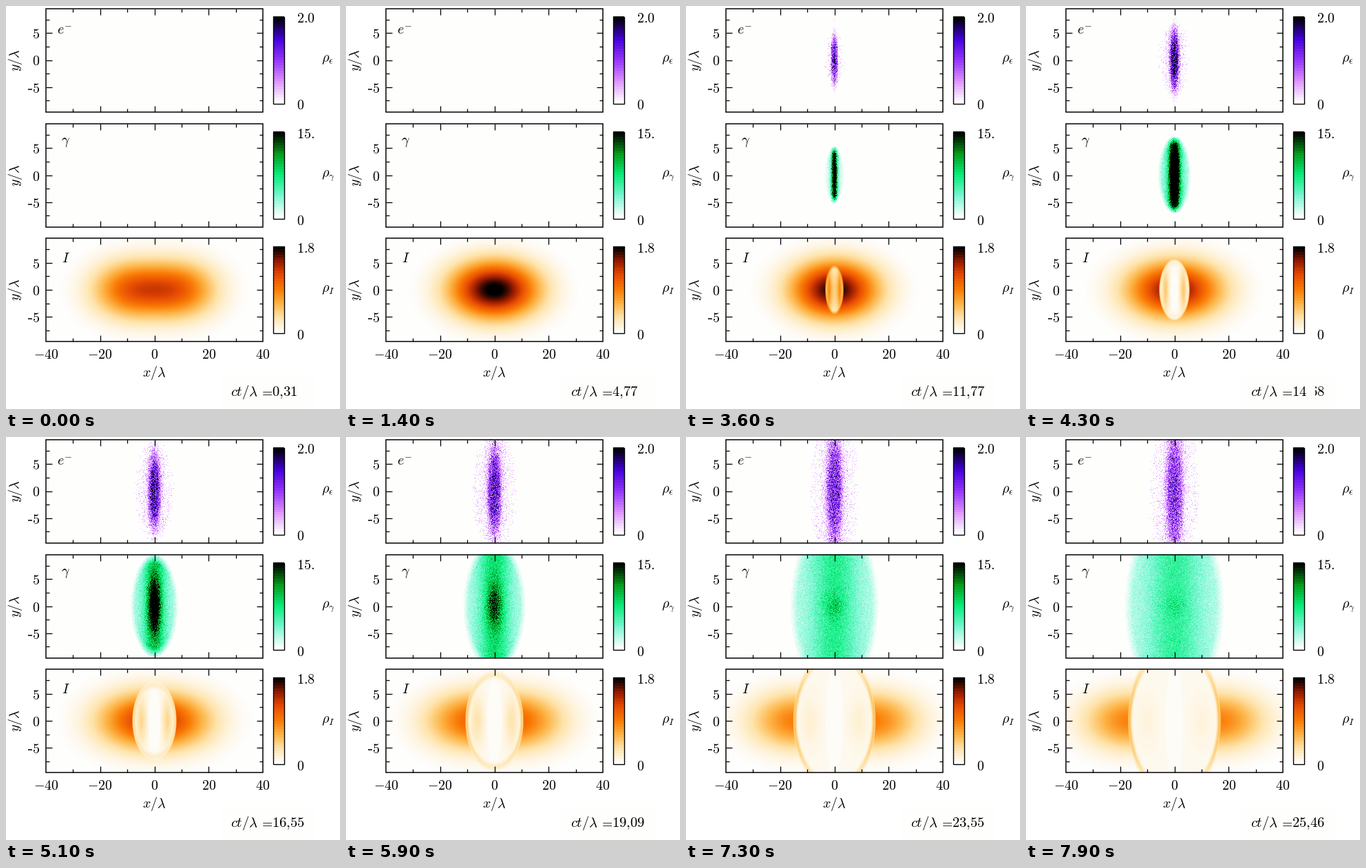
Recreate the animation shown at these times as a matplotlib script. Size 485x585 px, loop 8000 ms.

```python
import math

import matplotlib.pyplot as plt
import numpy as np
from matplotlib.animation import FuncAnimation
from matplotlib.colors import LinearSegmentedColormap
from matplotlib.patches import Rectangle

W, H, DPI = 485, 585, 80
FRAMES, INTERVAL = 80, 100
PT = 72 / DPI  # points per pixel
LEFT, PANEL_W, PANEL_H = 58, 315, 150
TOPS = (3.5, 170.5, 337)
SX, SY = PANEL_W / 80, 7.85  # pixels per wavelength
PAPER = "#fefefd"
IGNITION = 8.5  # ct/lambda at which the cascade starts
CROSSING = 9.3  # ct/lambda at which the two pulses overlap

plt.rcParams["mathtext.fontset"] = "cm"


def palette(name, *colors):
    return LinearSegmentedColormap.from_list(name, [PAPER, *colors, "black"])


PURPLE = palette("electrons", "#dd90ff", "#9434fb", "#4200da")
GREEN = palette("photons", "#78f7d2", "#06ee7a", "#079a1a")
ORANGE = palette("intensity", "#ffe4ac", "#fdb548", "#fa7d06", "#e84c03", "#9c1c00")

X, Y = np.meshgrid((np.arange(PANEL_W) + .5 - PANEL_W / 2) / SX,
                   (PANEL_H / 2 - .5 - np.arange(PANEL_H)) / SY)
JAG = np.repeat(np.random.default_rng(4).uniform(-.35, .15, PANEL_H // 3), 3)[:, None]


def gauss(u, width):
    return np.exp(-(u / width) ** 2)


def radius(a, b):
    return np.hypot(X / a, Y / b)


def inside(r, half_width, soft):
    return np.clip((1 - r) * half_width / soft + .5, 0, 1)


def grainy(mean, quantum, rng):
    return quantum * rng.poisson(mean / quantum)


def electrons(w, rng):
    """Density once the cascade front has travelled the distance w."""
    growth = min(w / 4, 1) ** 2
    core = radius(3.3 * (1 - math.exp(-w / 9)), 2.8 + .4 * w)
    cloud_w, cloud_h = 9 * math.tanh(w / 8), math.hypot(w, 3.3)
    cloud = inside(radius(cloud_w, cloud_h), cloud_w, 1.5)
    stripes = 1 + gauss(w, 7) * np.cos(2 * np.pi * X / 1.02)
    halo = (.14 + .4 * math.exp(-w / 4)) * stripes
    halo = halo * gauss(X, .38 * cloud_w) * gauss(Y, .8 * cloud_h) + .015
    peak = .24 + .6 * math.exp(-w / 12)
    dense = grainy(growth * peak * np.exp(-.7 * core ** 4), .07, rng)
    return dense + grainy(growth * halo * cloud, .16, rng)


def photons(w, rng):
    growth = min(w / 5.5, 1) ** 2
    shell = inside(radius(w, math.hypot(w, 3.3)), w, .5 + .15 * w)
    peak = 9 * math.exp(-w / 3.6) * gauss(X, .2 + .23 * w) * gauss(Y, 7 - .3 * w)
    broad = (.6 - .019 * w) * gauss(X, .55 * w) + .13
    return (grainy(growth * peak * shell, .06, rng)
            + grainy(growth * broad * shell, .01, rng))


def intensity(t):
    length = 13.6 + .1 * t
    shift = t - CROSSING
    field = .575 * gauss(Y, 5.1) * (gauss(X - shift, length) + gauss(X + shift, length))
    field = np.maximum(field - .012, 0)
    w = t - IGNITION
    if w < 1:
        return field

    depth = min((w - 1) / 3, 1)
    r = radius(w, math.hypot(.78 * w, 3.4))
    hole = depth * inside(r, w, .5)
    lobes = .28 * gauss(w, 12) * gauss(np.abs(X) - .6 * w, .24 * w)
    inner = .03 + lobes * gauss(Y, 4.5)
    core_w = 3.1 * (1 - gauss(w, 7)) * (1 + JAG * math.exp(-(w / 10) ** 4))
    inner = np.where(radius(core_w, 1.4 + .65 * w) < 1, .012, inner)

    field = field * (1 - .14 * depth) * (1 - hole) + inner * hole
    ring = .3 * (1 - gauss(w, 8)) * np.exp(-(r * Y / 8.5) ** 2 * 8.5 / w)
    return np.maximum(field, ring * gauss((r - 1) * w + .4, .9))


def counter(k):
    value = math.floor(100 * (k + 1) / math.pi) / 100
    return f"{value:g}".replace(".", "{,}")


def counter_width(label):
    return 10.4 * sum(c.isdigit() for c in label) + (5.8 if "," in label else 0)


fig = plt.figure(figsize=(W / DPI, H / DPI), dpi=DPI, facecolor="white")
ax = fig.add_axes([0, 0, 1, 1])
ax.set_xlim(0, W)
ax.set_ylim(H, 0)
ax.axis("off")


def line(x0, y0, x1, y1, width=1.3):
    ax.plot([x0, x1], [y0, y1], color="black", lw=width * PT,
            solid_capstyle="butt", zorder=3)


def box(x, y, w, h, width=1.5):
    ax.add_patch(Rectangle((x, y), w, h, fill=False, ec="black",
                           lw=width * PT, zorder=3))


def paper(x, y, w, h, zorder):
    return ax.add_patch(Rectangle((x, y), w, h, color=PAPER, lw=0, zorder=zorder))


def text(x, y, label, size=20, ha="left", va="baseline", zorder=4, **kw):
    return ax.text(x, y, f"${label}$", fontsize=size * PT, ha=ha, va=va,
                   zorder=zorder, **kw)


def picture(x, y, w, h, data, cmap):
    return ax.imshow(data, extent=(x, x + w, y + h, y), cmap=cmap, vmin=0, vmax=1,
                     interpolation="nearest", aspect="auto", zorder=1)


def panel(top, cmap):
    image = picture(LEFT, top, PANEL_W, PANEL_H, np.zeros_like(X), cmap)
    box(LEFT, top, PANEL_W, PANEL_H)
    right, bottom, mid = LEFT + PANEL_W, top + PANEL_H, top + PANEL_H / 2
    for i in range(-3, 4):
        size = 5 if i % 2 else 9
        x = LEFT + PANEL_W / 2 + 10 * i * SX
        line(x, top, x, top + size)
        line(x, bottom, x, bottom - size)
        y = mid + 2.5 * i * SY
        line(LEFT, y, LEFT + size, y)
        line(right, y, right - size, y)
    for value in (5, 0, -5):
        y = mid - value * SY
        text(49.5, y + 8, abs(value), ha="right")
        if value < 0:
            line(32, y + 3, 37.5, y + 3, 1.5)
    text(13, mid, r"y/\lambda", ha="center", va="center", rotation=90)
    return image


def colorbar(top, cmap, high, symbol):
    steps = np.linspace(1, 0, 32)
    picture(388, top, 16, 126, steps[:, None], cmap)
    box(388, top, 16, 126, 1.4)
    text(422, top + 9, high)
    text(422, top + 135, "0")
    text(458, top + 66, rf"\rho_{{{symbol}}}")


images = [panel(top, cmap) for top, cmap in zip(TOPS, (PURPLE, GREEN, ORANGE))]
colorbar(15.5, PURPLE, "2.0", r"\epsilon")
colorbar(182.5, GREEN, "15.", r"\gamma")
colorbar(349, ORANGE, "1.8", "I")
# the symbols are cut off at the right margin
ax.add_patch(Rectangle((475.5, 0), W - 475.5, H, color="white", lw=0, zorder=5))

text(74, 41, "e^{-}")
text(80, 200, r"\gamma")
text(81, 372, "I")

for value in range(-40, 41, 20):
    text(LEFT + PANEL_W / 2 + value * SX, 512, value, ha="center")
text(215, 538, r"x/\lambda", ha="center")

paper(312, 537, 137, 48, zorder=2)
text(325.5, 566, r"ct/\lambda", 20.7)
text(378.5, 566, "{=}", 20.7, ha="center")
old_count = text(386.5, 566, "0", 20.7)
cover = paper(386, 546, 10, 30, zorder=5)
count = text(386.5, 566, "0", 20.7, zorder=6)


def update(k):
    t = (k + 1) / math.pi
    rng = np.random.default_rng(100 + k)
    w = t - IGNITION
    for image, density in zip(images, (electrons, photons)):
        image.set_data(density(w, rng) if w > 0 else np.zeros_like(X))
    images[2].set_data(intensity(t))
    label = counter(k)
    # a short number leaves the end of the previous one uncovered
    old_count.set_text(f"${counter(max(k - 1, 0))}$")
    cover.set_width(counter_width(label) + 13)
    count.set_text(f"${label}$")
    return [*images, old_count, cover, count]


anim = FuncAnimation(fig, update, frames=FRAMES, interval=INTERVAL,
                     repeat=True, repeat_delay=0, blit=False)
plt.show()
```
